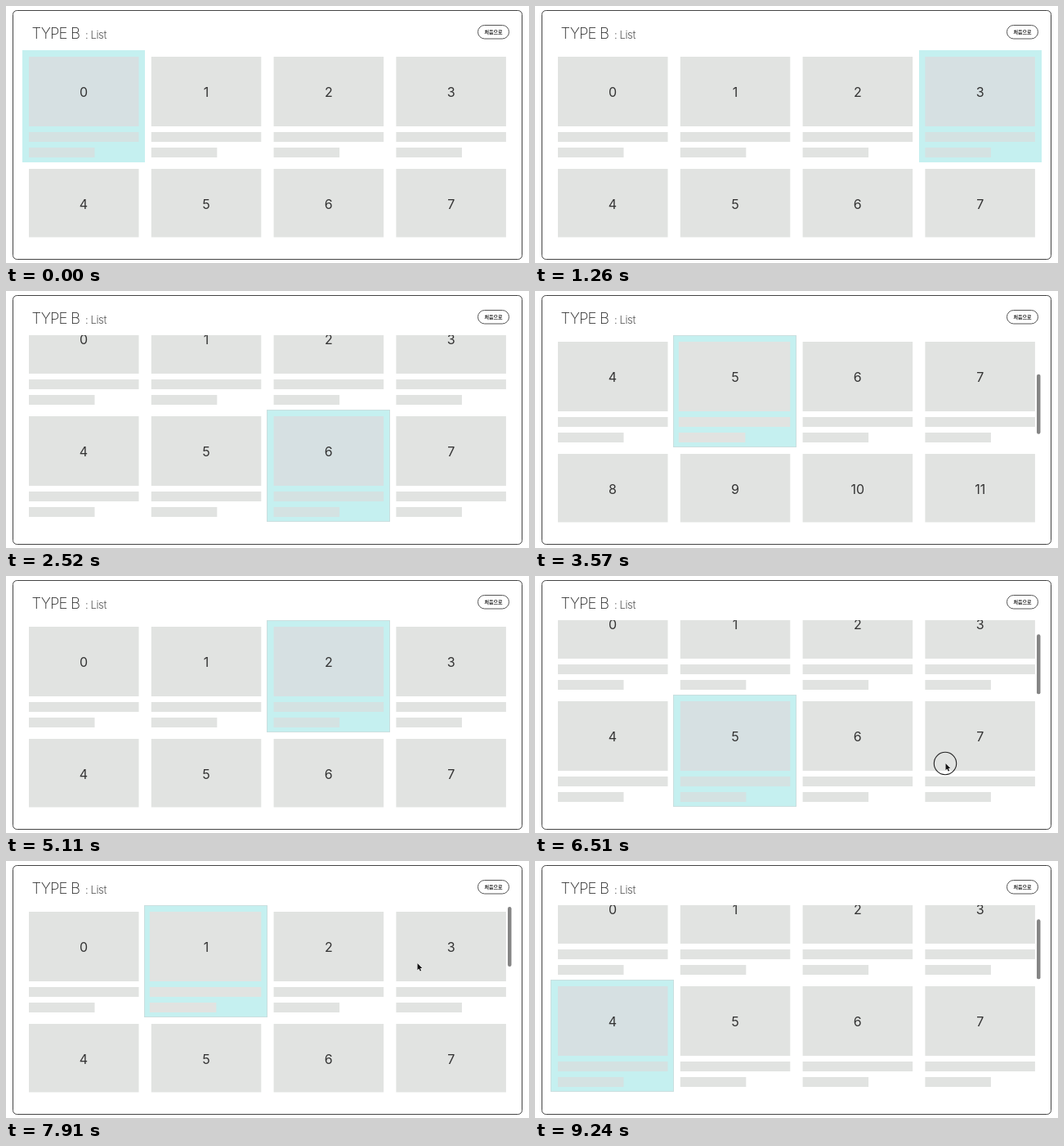
These frames come from a looping animation (640 px wide and 314 px high, 9.31 s). An HTML page with a canvas:

```html
<!DOCTYPE html>
<html lang="ko">
<head>
<meta charset="utf-8">
<style>
html, body { margin: 0; width: 640px; height: 314px; overflow: hidden; background: #fff; }
canvas { display: block; }
</style>
</head>
<body>
<canvas id="stage" width="640" height="314"></canvas>
<script>
const ctx = document.getElementById('stage').getContext('2d');
const LOOP = 9310, ROW = 137, TOP = 54, VIEW = 228, ITEMS = 20;

// [time, focused item, plain card]
const steps = [
  [0, 0], [630, 1], [910, 2], [1260, 3], [1540, 4], [1890, 5], [2240, 6],
  [2590, 10], [3080, 9], [3500, 5, true], [3850, 1, true], [4900, 2],
  [5320, 3], [5880, 7], [6160, 6], [6440, 5], [7630, 1, true],
  [8190, 2], [8470, 3], [8890, 4]
];

// Arrow keys move the focus; the list scrolls just far enough to show it.
function stateAt(t) {
  const s = { focus: 0, scroll: 0, scrolledAt: -1e4, plain: false };
  for (const [time, item, plain] of steps) {
    if (time > t) break;
    const y = Math.floor(item / 4) * ROW;
    const scroll = Math.min(y, Math.max(s.scroll, y + ROW - VIEW));
    if (scroll !== s.scroll) s.scrolledAt = time;
    Object.assign(s, { focus: item, scroll, plain: !!plain });
  }
  return s;
}

function box(x, y, w, h, color) {
  ctx.fillStyle = color;
  ctx.fillRect(x, y, w, h);
}

function rounded(x, y, w, h, r) {
  ctx.beginPath();
  ctx.roundRect(x, y, w, h, r);
}

function text(str, x, y, font, color, align = 'left', spacing = 0) {
  ctx.font = font;
  ctx.fillStyle = color;
  ctx.textAlign = align;
  ctx.letterSpacing = spacing + 'px';
  ctx.fillText(str, x, y);
}

function drawItem(i, s) {
  const col = i % 4;
  const y = TOP + Math.floor(i / 4) * ROW - s.scroll;
  if (y > TOP + VIEW || y + ROW < TOP) return;
  const focused = i === s.focus;
  const tinted = focused && !s.plain;
  const grow = focused && s.plain ? 2 : 0;
  const x = 28 + col * 149.8 - grow;
  if (focused) {
    const left = 20 + col * 150;
    box(left, y, 150, ROW, '#c5f0f0');
    if (s.scrolledAt > 0) {
      ctx.strokeStyle = '#cadfdf';
      ctx.lineWidth = 1;
      ctx.strokeRect(left - 0.5, y + 0.5, 150, ROW - 1);
    }
  }
  const bar = tinted ? '#d4e2e2' : '#e1e3e1';
  box(x, y + 8, 134.5 + grow, 85, tinted ? '#d6e0e2' : '#e1e3e1');
  box(x, y + 100, 134.5 + grow, 12, bar);
  box(x, y + 119, 80.5 + grow / 2, 12, bar);
  text(i, 95 + col * 149.9, y + 56.5, '16px Inter, sans-serif', '#333', 'center');
}

function drawScrollbar(t, s) {
  ctx.globalAlpha = Math.max(0, Math.min(1, 1 - (t - s.scrolledAt - 650) / 250));
  ctx.fillStyle = '#858585';
  rounded(614, 56 + s.scroll / 3, 4.5, 73, 2.2);
  ctx.fill();
  ctx.globalAlpha = 1;
}

function drawCursor(t) {
  if (t < 5810 || t >= 8750) return;
  const p = Math.max(0, Math.min(1, (t - 6860) / 560));
  const k = p * p * (3 - 2 * p);
  const x = 502.5 + k, y = 229 - 104 * k;
  if (t >= 6300 && t < 6720) {
    ctx.beginPath();
    ctx.arc(502, 229, 13.7, 0, 7);
    ctx.strokeStyle = '#222';
    ctx.lineWidth = 1.1;
    ctx.stroke();
  }
  ctx.save();
  ctx.translate(x, y);
  const arrow = new Path2D('M0 0V8.3L1.9 6.6L3.2 9.6L4.6 9L3.3 6.1H5.8Z');
  ctx.strokeStyle = '#fff';
  ctx.lineWidth = 1;
  ctx.stroke(arrow);
  ctx.fillStyle = '#111';
  ctx.fill(arrow);
  ctx.restore();
}

function drawChrome() {
  ctx.lineWidth = 1;
  ctx.strokeStyle = '#444';
  rounded(8.5, 5.5, 623, 304, 5);
  ctx.stroke();
  text('TYPE B', 31.5, 39.5, '200 18.5px Inter, sans-serif', '#222', 'left', -0.8);
  text(': List', 97, 39.5, '300 13px Inter, sans-serif', '#555', 'left', -0.4);
  ctx.strokeStyle = '#555';
  rounded(577.5, 23.5, 38, 16.5, 8.2);
  ctx.stroke();
  text('처음으로', 596.5, 34, 'bold 6px "Noto Sans CJK KR", "Noto Sans CJK", sans-serif', '#222', 'center');
}

function frame(now) {
  const t = now % LOOP;
  const s = stateAt(t);
  box(0, 0, 640, 314, '#fff');
  drawChrome();
  ctx.save();
  ctx.beginPath();
  ctx.rect(10, TOP, 620, VIEW + 0.5);
  ctx.clip();
  for (let i = 0; i < ITEMS; i++) if (i !== s.focus) drawItem(i, s);
  drawItem(s.focus, s);
  ctx.restore();
  drawScrollbar(t, s);
  drawCursor(t);
}

const start = performance.now();
function tick() {
  frame(performance.now() - start);
  requestAnimationFrame(tick);
}
tick();
</script>
</body>
</html>
```
